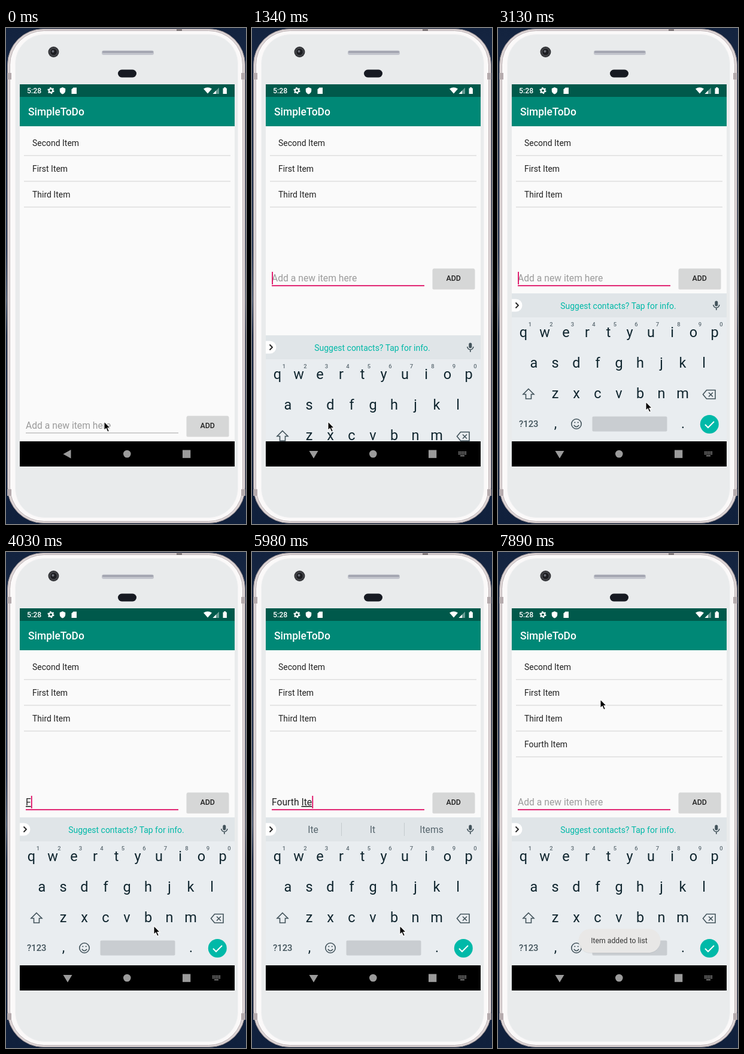
Animation of 401x828 px, one loop 8000 ms. Source, as an HTML page:

```html
<!DOCTYPE html>
<html lang="en">
<head>
<meta charset="utf-8">
<title>To-do app demo</title>
<style>
html, body { margin: 0; height: 100%; overflow: hidden; background: #13233f; }
svg { display: block; }
text { font-family: Roboto, sans-serif; white-space: pre; }
.mid { text-anchor: middle; }
.medium { font-weight: 500; }
.line { fill: none; stroke: #42535b; stroke-width: 1.6; }
#word { text-decoration: underline; text-decoration-thickness: 1px; }
</style>
</head>
<body>
<svg width="401" height="828" viewBox="0 0 401 828">
  <defs>
    <linearGradient id="desk" x2="0" y2="1">
      <stop offset="0" stop-color="#13233f"/><stop offset=".45" stop-color="#2a3a57"/>
      <stop offset=".55" stop-color="#56647c"/><stop offset=".62" stop-color="#1a2a47"/>
      <stop offset="1" stop-color="#10203c"/>
    </linearGradient>
  </defs>
  <rect width="401" height="828" fill="url(#desk)"/>

  <g id="phone">
    <rect x="2.5" y="1.5" width="397" height="825" rx="60" fill="#ddd5d6" stroke="#8f8688"/>
    <rect x="6.5" y="4.5" width="389" height="819" rx="57" fill="#fbf9f9" stroke="#bdb3b5"/>
    <rect x="15.5" y="10.5" width="372" height="807" rx="49" fill="#e9ebec" stroke="#f3f3f4"/>
    <path d="M2 75h7v11H2zM393 75h7v11h-7zM2 770h7v11H2zM393 770h7v11h-7z" fill="#b5abad"/>
    <path d="M285 2h9v3h-9z" fill="#7d7577"/>
    <circle cx="79.500" cy="40" r="9" fill="#35363a"/>
    <circle cx="79.500" cy="40" r="6" fill="#1c1d21" stroke="#5c5d62"/>
    <circle cx="78.500" cy="39" r="2" fill="#6b6e78"/>
    <rect x="160" y="37.500" width="87" height="7.500" rx="3" fill="#c3c5cd"/>
    <rect x="161" y="38.500" width="85" height="3" rx="1.500" fill="#9fa1ad"/>
    <rect x="187" y="69.500" width="31" height="13" rx="6.500" fill="#171a22"/>
  </g>

  <svg x="23" y="94" width="359" height="638" viewBox="23 94 359 638">
    <rect x="23" y="94" width="359" height="638" fill="#fafafa"/>
    <rect x="23" y="115" width="359" height="49" fill="#008876"/>
    <rect x="23" y="94" width="359" height="21" fill="#00594b"/>
    <g fill="#fff">
      <text class="medium" x="35" y="109" font-size="12.3">5:28</text>
      <circle cx="75" cy="104.500" r="3.200" fill="none" stroke="#fff" stroke-width="2.200"/>
      <circle cx="75" cy="104.500" r="4.800" fill="none" stroke="#fff" stroke-width="1.600" stroke-dasharray="2.5 2.526"/>
      <path d="M94.500 99l4.700 2v3.500q0 4-4.700 6-4.700-2-4.700-6V101z"/>
      <path d="M112.500 99.500h5.500v10.500h-8.500v-7.500z"/>
      <path d="M330 101.500q7-4.500 14 0l-7 8z"/>
      <path d="M356 99.500v10.500h-10.500z" opacity=".4"/><path d="M351 104.500v5.500h-5.500z"/>
      <path d="M362.500 100.500h1.700v-1.500h3v1.500h1.700v9.500h-6.400z"/>
      <text class="medium" x="37" y="146" font-size="17.46">SimpleToDo</text>
    </g>
    <g id="list" font-size="13.97" fill="#212121"></g>

    <g id="entry">
      <text id="hint" x="33" y="669" font-size="15.7" fill="#9b9b9b">Add a new item here</text>
      <text id="typed" x="33" y="669" font-size="15.7" fill="#212121"><tspan id="done"></tspan><tspan id="word"></tspan></text>
      <rect id="rule" x="33" width="255"/>
      <rect id="caret" y="653" width="1.800" height="21" fill="#de0a62"/>
      <rect x="301.500" y="648.500" width="71" height="34" rx="2" fill="#000" opacity=".14"/>
      <rect id="button" x="302" y="647.500" width="70" height="33.500" rx="2"/>
      <text class="mid medium" x="336.700" y="668.300" font-size="12.4" fill="#212121">ADD</text>
    </g>

    <g id="keyboard">
      <rect x="23" y="443" width="359" height="247" fill="#e9edf0"/>
      <rect x="23" y="443" width="359" height="40" fill="#e0e5e8"/>
      <path d="M23 452.500h7a10.500 10.500 0 0 1 0 21h-7z" fill="#fff"/>
      <path class="line" d="M29.500 458.500l4.500 4.500-4.500 4.500" style="stroke:#222;stroke-width:1.800"/>
      <rect x="362.300" y="455.500" width="5" height="9" rx="2.500" fill="#42535b"/>
      <path class="line" d="M359.800 462a5 5 0 0 0 10 0M364.800 467v4"/>
      <text id="tip" class="mid" x="201" y="468.500" font-size="13.97" fill="#00b9a8">Suggest contacts? Tap for info.</text>
      <g id="suggestions" font-size="15.7" fill="#56656d">
        <path d="M149.500 452v22M254.500 452v22" stroke="#c3cace"/>
        <text class="mid" x="102" y="469"></text>
        <text class="mid" x="201.500" y="469"></text>
        <text class="mid" x="300" y="469"></text>
      </g>
      <g id="keys" class="mid" fill="#0f252e"></g>
      <path class="line" d="M51 602.500l9 9h-4.500v7.500h-9v-7.500H42z"/>
      <path class="line" d="M348.500 604.500h14.500v14.500h-14.500l-6-7.250zM352 608.500l7 7m0-7l-7 7"/>
      <text class="mid medium" x="51.300" y="666" font-size="14.8" fill="#42535b">?123</text>
      <g class="mid" font-size="23" fill="#0f252e"><text x="96" y="668">,</text><text x="309" y="668">.</text></g>
      <circle class="line" cx="131" cy="661" r="8.200"/>
      <path class="line" d="M126.800 663q4.200 5.500 8.400 0M127.200 658.500h2.200m3.200 0h2.200"/>
      <rect x="157.500" y="648.500" width="125" height="25" rx="2" fill="#c9cdd1"/>
      <circle cx="353.300" cy="661.500" r="15.500" fill="#00b9a8"/>
      <path class="line" d="M346 662l5 5 10-10" style="stroke:#fff;stroke-width:2"/>
    </g>

    <g id="toast">
      <rect x="134.500" y="630" width="137" height="40" rx="20" fill="#000" opacity=".06"/>
      <rect x="134.500" y="629" width="137" height="40" rx="20" fill="#e9e8e7"/>
      <text class="mid" x="202.500" y="653" font-size="12.23" fill="#333">Item added to list</text>
    </g>

    <rect x="23" y="690" width="359" height="42"/>
    <g fill="#9b9b9b">
      <path id="back" d="M108.500 704v14.500l-13-7.250z"/>
      <g id="hide">
        <path d="M95.500 706h15l-7.500 12.500z"/>
        <path d="M345 708h13M345 711h13" stroke="#9b9b9b" stroke-width="1.800" stroke-dasharray="1.8 1"/>
        <path d="M348 714.200h7" stroke="#9b9b9b" stroke-width="1.500"/>
      </g>
      <circle cx="202.300" cy="711" r="6.300"/>
      <rect x="295" y="704.500" width="13.300" height="13.300"/>
    </g>
  </svg>

  <path id="pointer" d="M0 0V14.500L3.300 11.500 5.800 17.200 8.300 16.100 5.900 10.600H10.300Z" stroke="#fff" stroke-width="1.100"/>
</svg>

<script>
const LOOP = 8000;
const $ = id => document.getElementById(id);
const show = (id, on) => $(id).style.display = on ? '' : 'none';

// Each track is a list of [start time, value...]; a value holds until the next start.
const pointer = [[0, 164, 657], [140, 140, 657], [290, 127, 657], [1640, 150, 654], [1790, 220, 634],
  [1940, 247, 624], [6420, 290, 560], [6570, 365, 470], [6720, 392, 425], [6870, 352, 413],
  [7020, 343, 411], [7300, 332, 396], [7450, 292, 345], [7600, 225, 285], [7750, 182, 252], [7890, 171, 246]];
const caret = [[0, 0], [1190, 1], [1790, 0], [2240, 1], [2680, 0], [3130, 1], [3730, 0],
  [4030, 1], [6720, 0], [7150, 1], [7600, 0]];
const typing = [[0, '', ''], [4030, '', 'F'], [4330, '', 'Fo'], [4630, '', 'Four'], [4780, '', 'Fourt'],
  [4930, '', 'Fourth'], [5080, 'Fourth ', ''], [5530, 'Fourth ', 'I'], [5680, 'Fourth ', 'It'],
  [5980, 'Fourth ', 'Ite'], [6130, 'Fourth ', 'Item'], [7150, '', '']];
const suggestions = [[0], [4630, 'Four', 'Fourth', 'Fours'], [4780, 'Fourt', 'Fourth', 'Fourteen'],
  [4930, 'Fourth', 'Fourths', 'Forth'], [5080, 'and', 'of', 'in'], [5530, 'I', 'In', 'is'],
  [5680, 'It', 'Its', 'if'], [5980, 'Ite', 'It', 'Items'], [6130, 'Item', 'Items', 'Itemized'], [7150]];
const toast = [[0, 0], [7300, .4], [7450, .8], [7600, .97]];
const slide = [[0, 247], [1340, 70], [1490, 0]];

const at = (track, t) => track.findLast(step => step[0] <= t).slice(1);

$('list').innerHTML = ['Second', 'First', 'Third', 'Fourth'].map((name, i) =>
  `<g><text x="44" y="${197 + 43 * i}">${name} Item</text>
   <rect x="30" y="${212 + 43 * i}" width="345" height="1.700" fill="#e2e2e2"/></g>`).join('');

const row = (letters, x, y) => [...letters].map((c, i) =>
  `<text x="${x + 35.5 * i}" y="${y}" font-size="23.500">${c}</text>`).join('');
$('keys').innerHTML = row('qwertyuiop', 42.5, 516) + row('asdfghjkl', 60, 567) + row('zxcvbnm', 95.5, 618) +
  [...'1234567890'].map((d, i) =>
    `<text class="medium" x="${53.5 + 35.5 * i}" y="498" font-size="9.500" fill="#5c6a72">${d}</text>`).join('');

function draw(t) {
  const focused = t >= 1040, open = t >= 1340, added = t >= 7150;
  const [done, word] = at(typing, t);
  const words = at(suggestions, t);

  $('pointer').setAttribute('transform', `translate(${at(pointer, t)})`);
  show('toast', t >= 7300);
  $('toast').setAttribute('opacity', at(toast, t)[0]);
  $('list').lastElementChild.style.display = added ? '' : 'none';

  $('entry').setAttribute('transform', `translate(0 ${open ? -246 : 0})`);
  $('rule').setAttribute('y', focused ? 675.3 : 675.5);
  $('rule').setAttribute('height', focused ? 1.8 : 1);
  $('rule').setAttribute('fill', focused ? '#de0a62' : '#a5a5a5');
  $('button').setAttribute('fill', t >= 7020 && t < 7300 ? '#c6c7c7' : '#d6d7d7');
  $('done').textContent = done;
  $('word').textContent = word;
  show('hint', !(done + word));
  show('caret', at(caret, t)[0]);
  $('caret').setAttribute('x', 33.2 + (done + word ? $('typed').getComputedTextLength() : 0));

  show('keyboard', open);
  $('keyboard').setAttribute('transform', `translate(0 ${at(slide, t)[0]})`);
  show('tip', !words.length);
  show('suggestions', words.length);
  $('suggestions').querySelectorAll('text').forEach((el, i) => el.textContent = words[i] || '');
  show('back', !open);
  show('hide', open);
}

function tick() {
  draw(performance.now() % LOOP);
  requestAnimationFrame(tick);
}
tick();
</script>
</body>
</html>
```
